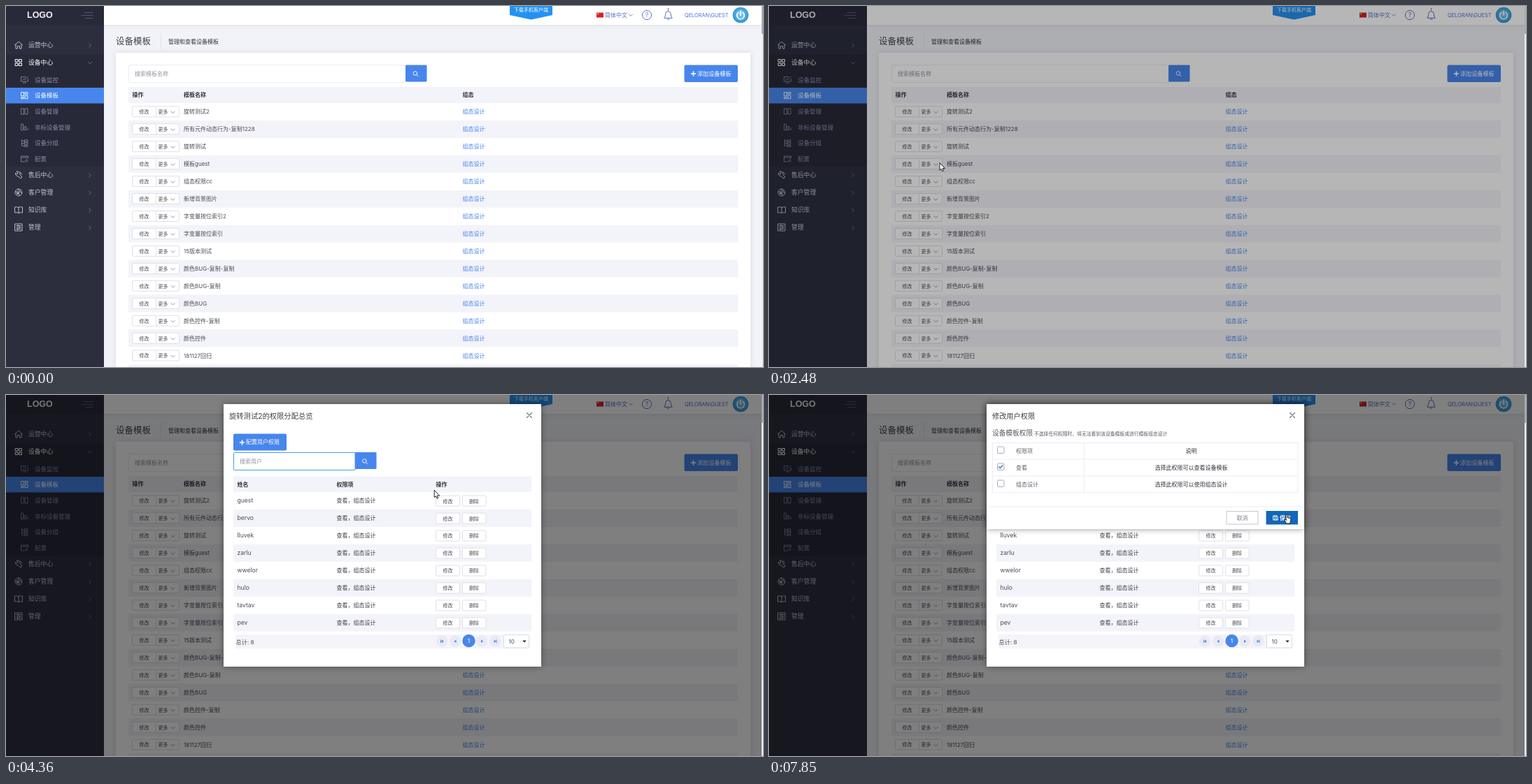
These frames come from a looping animation (1082 by 517 pixels, 8 s). An HTML page with a canvas:

```html
<!DOCTYPE html>
<html lang="zh-CN">
<head>
<meta charset="utf-8">
<title>设备模板</title>
<style>
  html, body { margin: 0; width: 100%; height: 100%; overflow: hidden; background: #f2f3f8; }
  canvas { display: block; }
</style>
</head>
<body>
<canvas id="stage" width="1082" height="517"></canvas>
<script>
const W = 1082, H = 517, LOOP = 8000;
const FONT = '"Inter", "Noto Sans CJK SC", "Noto Sans CJK JP", "Noto Sans CJK", sans-serif';
const BLUE = '#4786ec', BAND = '#f3f3fa', LINE = '#e4e5ee', INK = '#4b4d57';
const PITCH = 24.95;

// ---------- drawing helpers ----------
function layer(draw) {
  const c = document.createElement('canvas');
  c.width = W;
  c.height = H;
  draw(c.getContext('2d'));
  return c;
}

function box(g, x, y, w, h, fill, stroke, r = 0) {
  g.beginPath();
  g.roundRect(x, y, w, h, r);
  if (fill) { g.fillStyle = fill; g.fill(); }
  if (stroke) { g.strokeStyle = stroke; g.lineWidth = 1; g.stroke(); }
}

function text(g, s, x, y, size = 8, color = INK, weight = 400, align = 'left') {
  g.font = `${weight} ${size}px ${FONT}`;
  g.textAlign = align;
  g.fillStyle = color;
  g.fillText(s, x, y + size * 0.37);
}

function icon(g, d, x, y, color, width = 1, fill) {
  g.save();
  g.translate(x, y);
  const p = new Path2D(d);
  if (fill) { g.fillStyle = fill; g.fill(p); }
  if (color) {
    g.strokeStyle = color;
    g.lineWidth = width;
    g.lineJoin = g.lineCap = 'round';
    g.stroke(p);
  }
  g.restore();
}

function disc(g, x, y, r, fill, stroke) {
  g.beginPath();
  g.arc(x, y, r, 0, 7);
  if (fill) { g.fillStyle = fill; g.fill(); }
  if (stroke) { g.strokeStyle = stroke; g.lineWidth = 1; g.stroke(); }
}

function shadowed(g, blur, alpha, draw) {
  g.save();
  g.shadowBlur = blur;
  g.shadowColor = `rgba(0,0,0,${alpha})`;
  draw();
  g.restore();
}

const DOWN = 'M-2.5-1.2L0 1.3L2.5-1.2';
const RIGHT = 'M-1.2-2.5L1.3 0L-1.2 2.5';
const PLUS = 'M-3 0H3M0-3V3';
const CROSS = 'M-3.5-3.5L3.5 3.5M3.5-3.5L-3.5 3.5';
const LENS = 'M2.2-.6A2.8 2.8 0 1 1-3.4-.6A2.8 2.8 0 1 1 2.2-.6M1.4 1.5L3.8 3.9';
const ICONS = {
  home: 'M-5.5 0L0-5L5.5 0M-4-1V5H-1.5V1.5H1.5V5H4V-1',
  grid: 'M-4.5-4.5H-1V-1H-4.5ZM1-4.5H4.5V-1H1ZM-4.5 1H-1V4.5H-4.5ZM1 1H4.5V4.5H1Z',
  screen: 'M2-4H-5V2.5H5V-1M-2 4.5H2M-2.5 0L0-1.5L1 0L5-4',
  tiles: 'M-4.5-4.5H-1V.5H-4.5ZM1-4.5H4.5V-2H1ZM-4.5 2.5H-1V4.5H-4.5ZM1 0H4.5V4.5H1Z',
  bars: 'M-4.5-4H-1V4H-4.5ZM1-4H4.5V4H1Z',
  steps: 'M-4.5-4.5H-2V4H-4.5ZM0-1H2V4H0ZM4.5 1V4',
  tree: 'M-4-5V4H0M-4-3H0M-4 .5H0M0-4.5H4.5V-2H0ZM0-1H4.5V1.5H0ZM0 3H4.5V5H0Z',
  config: 'M5-1V-4H-5V4H0M-5-2H5M3 1A1.6 1.6 0 1 1 2.9 1',
  tool: 'M-4.5-2.5L-2-1L-1-3L-3-5A4 4 0 0 1 2-.5L5 3L3 5L-.5 2A4 4 0 0 1-4.5-2.5M2-4L5-1',
  people: 'M0-5A5 5 0 1 1-.1-5M-4-2L2 4M-1-4.5L4.5 1.5M-3 3L0 0L3-3M-1-1.5A1.8 1.8 0 1 1-1.1-1.5',
  book: 'M0-3.5Q-2-4.8-5.5-4V4Q-2 3.2 0 4.5Q2 3.2 5.5 4V-4Q2-4.8 0-3.5V4.5',
  panel: 'M-5-5H5V5H-5ZM-3-2.5H3M-3 0H3M-3 2.5H3M-1-3.5V-1.5M1.5-1V1M-1.5 1.5V3.5'
};

// ---------- page ----------
const MENU = [['home', '运营中心', 56], ['grid', '设备中心', 81], ['tool', '售后中心', 242],
  ['people', '客户管理', 267], ['book', '知识库', 292], ['panel', '管理', 317]];
const SUBMENU = [['screen', '设备监控'], ['tiles', '设备模板'], ['bars', '设备管理'],
  ['steps', '非标设备管理'], ['tree', '设备分组'], ['config', '配置']];
const TEMPLATES = ['旋转测试2', '所有元件动态行为-复制1228', '旋转测试', '模板guest', '组态权限cc',
  '新增背景图片', '字变量按位索引2', '字变量按位索引', '15版本测试', '颜色BUG-复制-复制', '颜色BUG-复制',
  '颜色BUG', '颜色控件-复制', '颜色控件', '181127回归'];
const USERS = ['guest', 'bervo', 'lluvek', 'zarlu', 'wwelor', 'hulo', 'tavtav', 'pev'];

function sidebar(g) {
  box(g, 0, 0, 140, H, '#2c2e3e');
  box(g, 0, 0, 140, 27, '#282a3a');
  box(g, 0, 69, 140, 161, '#282938');
  g.font = 'bold 12.5px "Liberation Sans", Arial, sans-serif';
  g.textAlign = 'left';
  g.fillStyle = '#f0f0f5';
  g.fillText('LOGO', 30, 17);
  icon(g, 'M112 9.5H124M108 13.5H124M114 17.5H124', 0, 0, '#53566f');
  for (const [name, label, y] of MENU) {
    const open = y === 81;
    icon(g, ICONS[name], 18, y, open ? '#fff' : '#b9bbcb');
    text(g, label, 32, y, 8.8, open ? '#fff' : '#c3c4d2', open ? 500 : 400);
    icon(g, open ? DOWN : RIGHT, 120, y + 0.5, open ? '#5b6fa8' : '#696c88');
  }
  box(g, 0, 117, 140, 22.5, BLUE);
  SUBMENU.forEach(([name, label], i) => {
    const y = 105.5 + i * 22.7, on = i === 1;
    icon(g, ICONS[name], 26.5, y, on ? '#fff' : '#7f829d', 0.9);
    text(g, label, 41, y, 8.5, on ? '#fff' : '#868aa5', on ? 500 : 400);
  });
}

function topbar(g) {
  shadowed(g, 6, 0.12, () => box(g, 140, 0, W - 140, 27, '#fff'));
  icon(g, 'M720 0H781V13L750.5 19.5L720 13Z', 0, 0, null, 0, '#2492f2');
  text(g, '下载手机客户端', 750.5, 5.5, 7, '#fff', 400, 'center');
  box(g, 844, 9.5, 10, 7, '#d2232a');
  box(g, 845.2, 10.5, 1.8, 1.8, '#f3cf3b');
  text(g, '简体中文', 856, 13, 8, '#5672c4');
  icon(g, DOWN, 893, 13, '#5672c4', 0.8);
  disc(g, 916, 13, 6.6, null, '#5c72c6');
  text(g, '?', 916, 13, 9, '#5c72c6', 400, 'center');
  icon(g, 'M-5.5 4.5Q-3.8 3-3.8-1A3.8 4 0 0 1 3.8-1Q3.8 3 5.5 4.5ZM-1.5 6.5H1.5M0-5V-6.5', 946.5, 12.5, '#5c72c6');
  disc(g, 946.5, 4, 1, '#e0566b');
  text(g, 'QELORAN\\GUEST', 970, 13, 7.4, '#4a72d8');
  const glow = g.createRadialGradient(1050, 11, 1, 1050, 13, 11.5);
  glow.addColorStop(0, '#86d0f5');
  glow.addColorStop(1, '#2b93d3');
  disc(g, 1050, 13, 11.3, glow);
  icon(g, 'M-3-4.4A5.3 5.3 0 1 0 3-4.4M0-6.5V-.5', 1050, 13.5, '#fff', 1.7);
}

function smallButton(g, x, y, w) {
  box(g, x + 0.5, y - 7.5, w, 15, '#fff', '#dfe0e8', 1.5);
}

function band(g, x, w, i) {
  if (i % 2) box(g, x, 139 + i * PITCH, w, PITCH, BAND);
}

const rowY = i => 151.3 + i * PITCH;

const page = layer(g => {
  box(g, 0, 0, W, H, '#f2f3f8');
  shadowed(g, 8, 0.1, () => box(g, 157, 67, 907, 470, '#fff'));
  topbar(g);
  sidebar(g);
  text(g, '设备模板', 157, 50, 12.5, '#3f4047');
  box(g, 221, 39, 1, 23, '#e1e2ea');
  text(g, '管理和查看设备模板', 232, 51, 8, '#33343c', 500);

  box(g, 175.5, 84.5, 396, 25, '#fff', '#ebedf2', 1);
  text(g, '搜索模板名称', 184, 97.5, 8, '#9294a0');
  box(g, 571, 84.5, 30.5, 24, BLUE, null, 1);
  icon(g, LENS, 585.5, 97, '#fff', 0.9);
  box(g, 969.5, 84.5, 76.5, 24.5, BLUE, null, 2);
  icon(g, PLUS, 982.5, 97, '#fff', 1.7);
  text(g, '添加设备模板', 988, 97, 8.1, '#fff', 500);

  box(g, 175, 116, 871, 23, BAND);
  text(g, '操作', 180.5, 127.5, 8, '#33343c', 600);
  text(g, '模板名称', 254, 127.5, 8, '#33343c', 600);
  text(g, '组态', 652.5, 127.5, 8, '#33343c', 600);
  for (let i = 0; i < 16; i++) {
    band(g, 175, 871, i);
    if (!TEMPLATES[i]) continue;
    const y = rowY(i);
    smallButton(g, 180, y, 67);
    box(g, 214, y - 7, 1, 14, '#e2e3ea');
    text(g, '修改', 190.5, y + 0.3, 7);
    text(g, '更多', 217.5, y + 0.3, 7);
    icon(g, DOWN, 238.5, y + 1, '#777985', 0.8);
    text(g, TEMPLATES[i], 254, y);
    text(g, '组态设计', 652.5, y, 8, BLUE);
  }
  box(g, 1080, 0, 2, H, '#ececf1');
  box(g, 1080, 0, 2, 40, '#a9aab2');
});

// ---------- dialogs ----------
function dialog(g, h, title, size) {
  shadowed(g, 9, 0.4, () => box(g, 311, 13, 454, h, '#fff'));
  text(g, title, 319, 30, size, '#3f4047');
  icon(g, CROSS, 748, 29, '#70727c', 1.1);
}

const userList = layer(g => {
  dialog(g, 376, '旋转测试2的权限分配总览', 10.3);
  box(g, 325, 55.5, 76, 24, BLUE, null, 2);
  icon(g, PLUS, 337.5, 68, '#fff', 1.7);
  text(g, '配置用户权限', 343, 67.5, 8, '#fff', 500);
  box(g, 325.5, 82.5, 174, 25, '#fff', '#e6e8f0', 1);
  text(g, '搜索用户', 334, 95.5, 8, '#9294a0');
  box(g, 499, 82, 30.5, 24, BLUE, null, 1);
  icon(g, LENS, 513, 95, '#fff', 0.9);

  box(g, 325, 116.5, 426, 22.5, BAND);
  text(g, '姓名', 330.5, 128, 8, '#33343c', 600);
  text(g, '权限项', 472.5, 128, 8, '#33343c', 600);
  text(g, '操作', 614.5, 128, 8, '#33343c', 600);
  USERS.forEach((name, i) => {
    const y = rowY(i);
    band(g, 325, 426, i);
    text(g, name, 330.5, y, 8.6);
    text(g, '查看，组态设计', 472.5, y, 8, '#3f4149', 500);
    smallButton(g, 614, y + 0.4, 34);
    smallButton(g, 652, y + 0.4, 33.5);
    text(g, '修改', 631.5, y + 0.7, 7, INK, 400, 'center');
    text(g, '删除', 669, y + 0.7, 7, INK, 400, 'center');
  });

  box(g, 328, 343, 420, 20, '#f4f4fa');
  text(g, '总计: 8', 328.5, 353.5, 8.2);
  for (const x of [623, 642, 680, 699]) disc(g, x, 352.5, 8.3, '#e9eaf5');
  const back = 'M1.5-2.3L-1.5 0L1.5 2.3Z', next = 'M-1.5-2.3L1.5 0L-1.5 2.3Z';
  icon(g, back + 'M-2.5-2.3H-1.5V2.3H-2.5Z', 623.5, 352.7, null, 0, BLUE);
  icon(g, back, 642, 352.7, null, 0, BLUE);
  icon(g, next, 680.5, 352.7, null, 0, BLUE);
  icon(g, next + 'M1.5-2.3H2.5V2.3H1.5Z', 699, 352.7, null, 0, BLUE);
  disc(g, 661.5, 352, 9.2, BLUE);
  text(g, '1', 661.5, 352, 8, '#fff', 500, 'center');
  box(g, 711.5, 343.5, 36, 18.5, '#fff', '#d9dbe5', 1);
  text(g, '10', 718.5, 353, 8);
  icon(g, 'M-2.7-1.4H2.7L0 1.6Z', 741, 353, null, 0, '#222');
});

const rights = layer(g => {
  dialog(g, 179, '修改用户权限', 10.2);
  text(g, '设备模板权限', 319, 54.5, 9.7, '#575962');
  text(g, '不选择任何权限时，将无法看到该设备模板或进行模板组态设计', 379, 55, 6.8, '#575962');
  for (const y of [68, 91.5, 115.5, 139]) box(g, 319, y, 437, 1, '#ebedf2');
  for (const x of [319, 450, 755.5]) box(g, x, 68, 1, 71.5, '#ebedf2');
  [['权限项', '说明'], ['查看', '选择此权限可以查看设备模板'], ['组态设计', '选择此权限可以使用组态设计']]
    .forEach(([name, note], i) => {
      const y = 80 + i * 23.9;
      text(g, name, 353, y, 8, '#63656f');
      text(g, note, 603.5, y, 8, '#33353d', 400, 'center');
    });
  box(g, 311, 159.5, 454, 1, '#e9ebf1');
  box(g, 654, 166.5, 45, 18.5, '#fff', '#c3c5cd');
  text(g, '取消', 676.5, 176, 8, '#7c7e88', 400, 'center');
});

function checkbox(g, i, on) {
  const y = 79 + i * 24;
  box(g, 326.5, y - 5, 9.5, 9.5, '#fff', '#a8acba', 1.5);
  if (on) icon(g, 'M-2.7-.2L-.8 1.8L2.8-2.2', 331.2, y, '#3f6fb5', 1.3);
}

function saveButton(g, hover) {
  box(g, 710.5, 166, 45.5, 19.5, hover ? '#1467b8' : '#2196f3');
  icon(g, 'M-3-3H2L3.2-1.8V3H-3ZM-1.5-3V-1H1.3V-3M-1.5 3V1H1.7V3', 724, 176, '#fff', 0.9);
  text(g, '保存', 730, 176, 8, '#fff', 600);
}

function dropdown(g, y) {
  shadowed(g, 8, 0.2, () => box(g, 213.5, 160, 80, 76.5, '#fff', null, 1));
  ['删除', '复制', '设备模板权限'].forEach((label, i) => {
    const top = 163.5 + i * 23;
    if (y >= top && y < top + 23) box(g, 213.5, top, 80, 22.5, '#f4f5fa');
    text(g, label, 223, top + 11.7, 8, '#5f616b');
  });
}

// ---------- pointer ----------
const TRACK = [
  [70, 1008, 493], [280, 720, 370], [490, 400, 230], [700, 245, 162], [840, 220, 151],
  [990, 218, 150], [1220, 218, 150], [1380, 226, 166], [1550, 234, 189], [1750, 238, 206],
  [1940, 240, 218], [2090, 241, 220], [2240, 243, 224], [2410, 244, 225], [2960, 244, 225],
  [3190, 358, 176], [3480, 470, 120], [3810, 538, 91], [3960, 550, 97], [4250, 602, 128],
  [4520, 627, 149], [4760, 628, 150], [5050, 570, 160], [5280, 465, 146], [5510, 388, 129],
  [5850, 350, 126], [6200, 334, 125], [6370, 332, 124], [6540, 332, 124], [6800, 450, 139],
  [7050, 640, 152], [7230, 724, 157], [7300, 733, 165], [7710, 738, 168], [7850, 740, 171]
];
const HAND_TIMES = [[790, 2410], [4420, 4880], [6180, 6590], [7290, LOOP]];

function pointerAt(t) {
  const i = TRACK.findIndex(k => k[0] > t);
  if (i < 0) return TRACK[TRACK.length - 1].slice(1);
  const [t0, x0, y0] = TRACK[i - 1], [t1, x1, y1] = TRACK[i];
  const p = (t - t0) / (t1 - t0);
  return [x0 + (x1 - x0) * p, y0 + (y1 - y0) * p];
}

function pointer(g, t, x, y) {
  const hand = HAND_TIMES.some(([a, b]) => t >= a && t < b);
  const shape = hand
    ? 'M-1 .8Q0-.4 1 .8V4.6L5 5.6Q6 6 5.8 7.5L5 11.5V13H-1.2V11.5L-3.6 8Q-3.6 6.6-2.4 7L-1 8.4Z'
    : 'M0 0V10.2L2.3 8.2L3.9 11.8L5.6 11L4 7.6H7Z';
  icon(g, shape, x, y, '#111', 0.9, '#fff');
}

// ---------- timeline ----------
const clamp = v => Math.max(0, Math.min(1, v));

function drop(g, t, start, slide, height, draw) {
  if (t < start) return;
  const rest = 1 - clamp((t - start) / slide);
  g.save();
  g.globalAlpha = clamp((t - start) / 175);
  g.translate(0, -height * 0.25 * rest * rest);
  draw();
  g.restore();
}

const rightsLayer = document.createElement('canvas');
rightsLayer.width = W;
rightsLayer.height = H;
const rg = rightsLayer.getContext('2d');

function paintRights(t) {
  const cleared = t >= 6500;
  rg.clearRect(0, 0, W, H);
  rg.drawImage(rights, 0, 0);
  checkbox(rg, 0, !cleared);
  checkbox(rg, 1, true);
  checkbox(rg, 2, !cleared);
  saveButton(rg, t >= 7300);
}

const g = document.getElementById('stage').getContext('2d');

function paint(t) {
  g.drawImage(page, 0, 0);
  const [x, y] = t >= 70 ? pointerAt(t) : [-50, -50];
  if (t >= 1220 && t < 2410) dropdown(g, y);

  if (t >= 2400) {
    g.fillStyle = `rgba(0,0,0,${0.5 * clamp((t - 2400) / 140)})`;
    g.fillRect(0, 0, 1080, H);
  }
  drop(g, t, 2545, 175, 376, () => {
    g.drawImage(userList, 0, 0);
    if (t < 4600) box(g, 325.5, 82.5, 173.5, 25, null, '#4a9be8', 1);
  });
  drop(g, t, 4890, 275, 180, () => {
    paintRights(t);
    g.drawImage(rightsLayer, 0, 0);
  });
  if (t >= 70) pointer(g, t, x, y);
}

let begin;
function tick(time) {
  if (begin === undefined) begin = time;
  paint((time - begin) % LOOP);
  requestAnimationFrame(tick);
}
requestAnimationFrame(tick);
</script>
</body>
</html>
```
